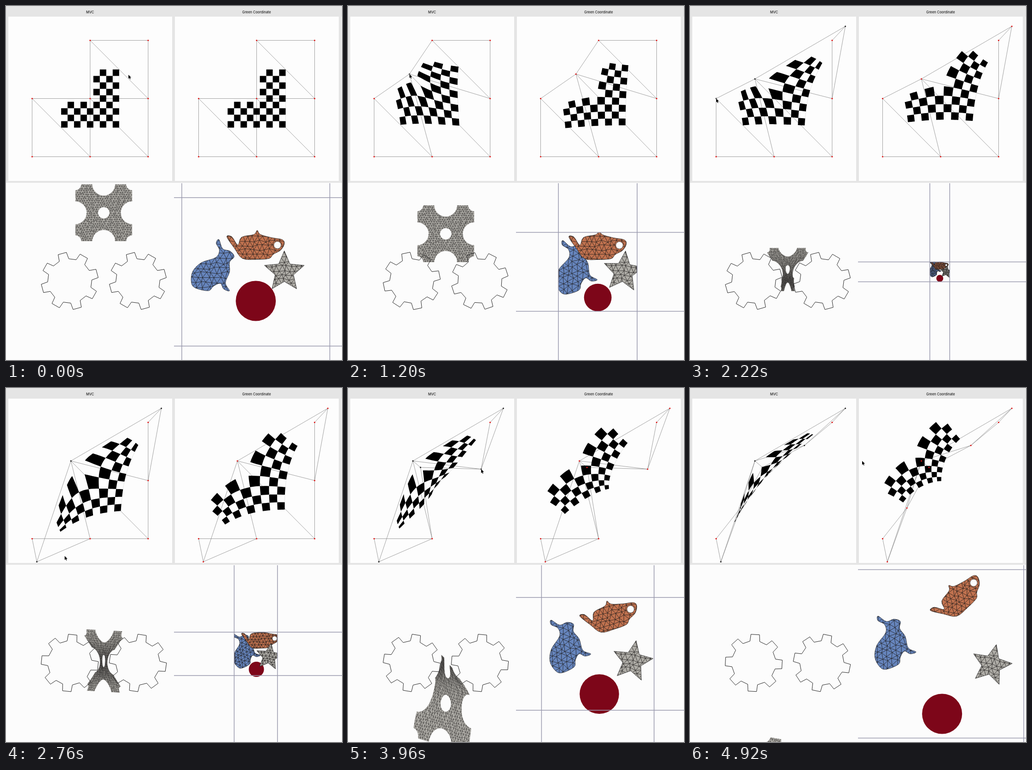
These frames come from a looping animation (730x767 px, 4980 ms). An HTML page with a canvas:

```html
<!DOCTYPE html>
<html lang="en">
<head>
<meta charset="utf-8">
<title>Cage deformation and elastic contact</title>
<style>
html, body { margin: 0; width: 100%; height: 100%; overflow: hidden; background: #fcfcfc; }
canvas { display: block; }
</style>
</head>
<body>
<canvas id="stage" width="730" height="767"></canvas>
<script>
const ctx = document.getElementById('stage').getContext('2d');
const LOOP = 4980, STEP = 60, TAU = Math.PI * 2, DEG = TAU / 360;

const clamp = (v, low, high) => Math.min(high, Math.max(low, v));
const lerp = (a, b, f) => a + (b - a) * f;
const turn = ([x, y], a) => [x * Math.cos(a) - y * Math.sin(a), x * Math.sin(a) + y * Math.cos(a)];
const noise = n => { const s = Math.sin(n * 127.1) * 43758.5453; return s - Math.floor(s) - .5; };

// Linear keyframes: each key is [time, ...values].
function track(t, keys) {
  const i = keys.findIndex(k => k[0] > t);
  if (i < 1) return keys[i < 0 ? keys.length - 1 : 0].slice(1);
  const a = keys[i - 1], b = keys[i], f = (t - a[0]) / (b[0] - a[0]);
  return a.slice(1).map((v, k) => lerp(v, b[k + 1], f));
}

function trace(points, close = true) {
  points.forEach(([x, y], i) => i ? ctx.lineTo(x, y) : ctx.moveTo(x, y));
  if (close) ctx.closePath();
}

// ---------- Cage deformation ----------
const UNIT = 126, CELL = UNIT / 9, LEFT = 56.8, TOP = 74.5;
const cage = [[1, 0], [2, 0], [2, 1], [2, 2], [1, 2], [0, 2], [0, 1], [1, 1]]
  .map(([i, j]) => [LEFT + i * UNIT, TOP + j * UNIT]);
const cageEdges = [...cage.map((_, i) => [i, (i + 1) % 8]), [0, 2], [7, 2], [7, 3], [7, 4], [6, 4]];

// Vertex, start time, end time, destination.
const drags = [
  [7, 180, 540, 107.5, 136.5], [7, 540, 1200, 133.5, 147.5], [7, 1200, 1320, 141, 158],
  [0, 1500, 2040, 337.5, 44], [6, 2220, 2700, 67, 376.5], [3, 2940, 3345, 157.5, 172],
  [2, 3840, 4210, 248.5, 124.5], [4, 4440, 4740, 109.5, 260]
];
const vertexKeys = cage.map(v => [[0, ...v]]);
const pointerKeys = [[0, 266, 149]];
for (const [vertex, start, end, x, y] of drags) {
  const keys = vertexKeys[vertex];
  const move = [[start, ...keys[keys.length - 1].slice(1)], [end, x, y]];
  keys.push(...move);
  pointerKeys.push(...move);
}
pointerKeys.push([4920, 374, 158]);

function meanValue(p) {
  const d = cage.map(v => [v[0] - p[0], v[1] - p[1]]);
  const r = d.map(v => Math.hypot(...v));
  const halfTan = d.map((a, i) => {
    const j = (i + 1) % 8, b = d[j];
    return (a[0] * b[1] - a[1] * b[0]) / (r[i] * r[j] + a[0] * b[0] + a[1] * b[1]);
  });
  const w = r.map((len, i) => (halfTan[(i + 7) % 8] + halfTan[i]) / len);
  const sum = w.reduce((a, b) => a + b);
  return { phi: w.map(v => v / sum) };
}

function green(p) {
  const phi = Array(8).fill(0), psi = [];
  cage.forEach((a, i) => {
    const j = (i + 1) % 8, b = cage[j];
    const len = Math.hypot(b[0] - a[0], b[1] - a[1]);
    const tx = (b[0] - a[0]) / len, ty = (b[1] - a[1]) / len;
    const x = a[0] - p[0], y = a[1] - p[1];
    const s0 = x * tx + y * ty, s1 = s0 + len, d = x * ty - y * tx;
    const l0 = Math.log(Math.hypot(s0, d)), l1 = Math.log(Math.hypot(s1, d));
    const angle = Math.atan2(d * len, s0 * s1 + d * d);
    const end = (d * (l1 - l0) - s0 * angle) / (TAU * len);
    phi[j] += end;
    phi[i] += angle / TAU - end;
    psi[i] = -(s1 * l1 - s0 * l0 - len + d * angle) / (TAU * len);
  });
  return { phi, psi };
}

function deform({ phi, psi }, verts) {
  let x = 0, y = 0;
  verts.forEach((v, i) => {
    x += phi[i] * v[0];
    y += phi[i] * v[1];
    if (psi) {
      const next = verts[(i + 1) % 8];
      x += psi[i] * (next[1] - v[1]);
      y -= psi[i] * (next[0] - v[0]);
    }
  });
  return [x, y];
}

// The tiny offset keeps samples off the lines through the cage edges.
const boardPoint = (i, j) => [LEFT + UNIT / 2 + i * CELL + .001, TOP + UNIT / 2 + j * CELL + .001];
const blackCells = [];
for (let j = 0; j < 9; j++) for (let i = j < 5 ? 5 : 0; i < 9; i++) {
  if ((i + j) % 2) continue;
  const cell = [];
  for (const [x, y, dx, dy] of [[0, 0, 1, 0], [1, 0, 0, 1], [1, 1, -1, 0], [0, 1, 0, -1]])
    for (let k = 0; k < 1; k += .25) cell.push(boardPoint(i + x + dx * k, j + y + dy * k));
  blackCells.push(cell);
}
const rightSide = Array.from({ length: 37 }, (_, k) => boardPoint(9, k / 4));
const panels = [[0, meanValue], [361.7, green]].map(([offset, weigh]) => ({
  offset,
  cells: blackCells.map(c => c.map(weigh)),
  side: rightSide.map(weigh)
}));

function drawCagePanel(panel, verts, t) {
  const place = w => deform(w, verts);
  ctx.save();
  ctx.translate(panel.offset, 0);
  ctx.lineWidth = .7;
  ctx.strokeStyle = '#777';
  ctx.beginPath();
  cageEdges.forEach(([a, b]) => trace([verts[a], verts[b]], false));
  ctx.stroke();
  ctx.strokeStyle = '#ddd';
  ctx.beginPath();
  trace(panel.side.map(place), false);
  ctx.stroke();
  ctx.fillStyle = '#000';
  ctx.beginPath();
  panel.cells.forEach(cell => trace(cell.map(place)));
  ctx.fill();
  verts.forEach(([x, y], i) => {
    const touched = panel.offset === 0 && vertexKeys[i].length > 1 && t >= vertexKeys[i][1][0];
    ctx.fillStyle = touched ? '#222' : '#e01818';
    ctx.beginPath();
    ctx.arc(x, y, 1.6, 0, TAU);
    ctx.fill();
  });
  ctx.restore();
}

function drawPointer([x, y]) {
  ctx.beginPath();
  trace([[0, 0], [0, 8.5], [2, 6.8], [3.4, 9.8], [4.7, 9.2], [3.4, 6.2], [6, 6]]
    .map(([a, b]) => [x + a, y + b]));
  ctx.lineWidth = 1;
  ctx.strokeStyle = '#fff';
  ctx.stroke();
  ctx.fillStyle = '#000';
  ctx.fill();
}

// ---------- Triangulated bodies ----------
function densify(points) {
  return points.flatMap((a, i) => {
    const b = points[(i + 1) % points.length];
    const n = Math.ceil(Math.hypot(b[0] - a[0], b[1] - a[1]) / 4);
    return Array.from({ length: n }, (_, k) => [lerp(a[0], b[0], k / n), lerp(a[1], b[1], k / n)]);
  });
}

// Closed Catmull-Rom curve through the points, relative to a centre.
function spline(cx, cy, points) {
  const n = points.length;
  return points.flatMap((p1, i) => {
    const p0 = points[(i + n - 1) % n], p2 = points[(i + 1) % n], p3 = points[(i + 2) % n];
    return [0, .25, .5, .75].map(u => [0, 1].map(c =>
      p1[c] + .5 * u * (p2[c] - p0[c] + u * (2 * p0[c] - 5 * p1[c] + 4 * p2[c] - p3[c]
        + u * (3 * (p1[c] - p2[c]) + p3[c] - p0[c]))) - [cx, cy][c]));
  });
}

const arc = (cx, cy, r, from, to, n = 14) => Array.from({ length: n + 1 }, (_, k) => {
  const a = lerp(from, to, k / n);
  return [cx + r * Math.cos(a), cy + r * Math.sin(a)];
});

// A jittered triangular grid, clipped to the loops when drawn.
function body(loops, fill, spacing, extent, line) {
  const n = Math.ceil(extent * 2 / spacing), rows = Math.ceil(n / .866);
  const nodes = [], edges = [];
  const id = (i, j) => j * (n + 1) + i;
  for (let j = 0; j <= rows; j++) for (let i = 0; i <= n; i++) {
    const k = id(i, j), odd = j % 2, side = i + (odd ? 1 : -1);
    nodes.push([-extent + (i + odd / 2 + noise(k + 1) * .5) * spacing,
                -extent + (j * .866 + noise(k + 5000) * .5) * spacing]);
    if (i < n) edges.push([k, id(i + 1, j)]);
    if (j < rows) {
      edges.push([k, id(i, j + 1)]);
      if (side >= 0 && side <= n) edges.push([k, id(side, j + 1)]);
    }
  }
  return { loops: loops.map(densify), fill, nodes, edges, line };
}

function drawBody({ loops, fill, nodes, edges, line }, warp) {
  const outline = new Path2D();
  loops.forEach(loop => {
    loop.map(warp).forEach(([x, y], i) => i ? outline.lineTo(x, y) : outline.moveTo(x, y));
    outline.closePath();
  });
  ctx.fillStyle = fill;
  ctx.fill(outline);
  ctx.save();
  ctx.clip(outline);
  const placed = nodes.map(warp);
  ctx.strokeStyle = '#1c1a1a';
  ctx.lineWidth = line;
  ctx.beginPath();
  edges.forEach(([a, b]) => trace([placed[a], placed[b]], false));
  ctx.stroke();
  ctx.restore();
  ctx.lineWidth = .8;
  ctx.stroke(outline);
}

// ---------- Soft plate pulled through two gears ----------
const HALF = 62, GEAR_Y = 595.7, PLATE_X = 212.3, CONTACT = 1200;
const plateSide = [...arc(-HALF, -HALF, 13, TAU / 4, 0, 5), ...arc(0, -HALF, 24.5, TAU / 2, 0)];
const plate = body([
  [0, 1, 2, 3].flatMap(q => plateSide.map(p => turn(p, q * TAU / 4))),
  arc(0, 0, 12, TAU, 0, 24).slice(1)
], '#b7b5af', 5.2, HALF, .55);

// Time, centre height, vertical stretch, tilt.
const plateKeys = [[CONTACT, 493.5, 1, 0], [2220, 571, .76, 0], [3300, 612, 1.4, .08],
                   [3960, 683, 1.5, .2], [4920, 826, 1, .17]];

function drawPlate(t) {
  const [cy, stretch, tilt] = t < CONTACT ? [448 + 3.16e-5 * t * t, 1, 0] : track(t, plateKeys);
  const pinch = .78 * clamp((t - CONTACT) / 800, 0, 1);
  drawBody(plate, p => {
    const [px, py] = turn(p, tilt);
    const y = cy + py * stretch;
    return [PLATE_X + px * (1 - pinch * Math.exp(-(((y - GEAR_Y) / 60) ** 2))), y];
  });
}

function drawGear(cx, degrees) {
  const points = [];
  for (let k = 0; k < 8; k++)
    for (const [r, a] of [[48, -12.8], [62.3, -8.6], [62.3, 8.6], [48, 12.8]]) {
      const [x, y] = turn([0, -r], (degrees + a + k * 45) * DEG);
      points.push([cx + x, GEAR_Y + y]);
    }
  ctx.beginPath();
  trace(points);
  ctx.lineWidth = 1;
  ctx.strokeStyle = '#222';
  ctx.stroke();
}

// ---------- Bodies in a shrinking and growing box ----------
const BOX_X = 542.7, BOX_Y = 576, NARROWEST = 2287, MIN_HALF = 17.4, MAX_HALF = 182.5;

const bunny = body([spline(450, 570, [
  [463, 506], [471, 526], [487, 531], [496, 543], [486, 555], [486, 576], [477, 600],
  [486, 617], [473, 613], [466, 601], [451, 607], [440, 617], [412, 611], [403, 599],
  [406, 575], [425, 556], [456, 545], [464, 529], [457, 514]])], '#6685bd', 12, 75, .8);

const teapot = body([spline(543, 520, [
  [480, 500], [491, 500], [504, 518], [512, 501], [539, 495], [546, 486], [553, 495], [578, 502],
  [600, 506], [605, 515], [597, 529], [581, 538], [572, 547], [545, 549], [514, 547], [496, 524]]),
  arc(47, -2, 8, TAU, 0)], '#c0724f', 11, 68, .8);

const star = body([Array.from({ length: 10 }, (_, k) => turn([0, k % 2 ? -21 : -45.5], k * TAU / 10))],
  '#aeaca6', 11, 50, .8);

// Offsets from the box centre before and after the squeeze, and angles when squeezed and at the end.
const floating = [
  { shape: bunny, from: [-93, -6], to: [-108, -22], squeezed: -40, end: -35 },
  { shape: teapot, from: [0, -56], to: [40, -121], squeezed: 0, end: -42 },
  { shape: star, from: [62, 0], to: [112, 24], squeezed: 8, end: 14 }
];
const disc = { from: [0, 63], to: [5, 130] };

function drawBox(t) {
  const half = MIN_HALF + .0627 * Math.abs(t - NARROWEST);
  const growing = t > NARROWEST;
  const grown = (half - MIN_HALF) / (MAX_HALF - MIN_HALF);
  const squeeze = clamp((130 - half) / 60, 0, 1);
  const scale = Math.min(1, half / 72);
  // Walls push bodies inwards; afterwards they spread in proportion to the box.
  const position = ({ from, to }) => [0, 1].map(c => [BOX_X, BOX_Y][c] +
    (growing ? to[c] * half / MAX_HALF : clamp(from[c], -.65 * half, .65 * half)));
  const inside = (v, c) => clamp(v, c - half, c + half);

  ctx.fillStyle = '#7d0619';
  ctx.beginPath();
  ctx.arc(...position(disc), Math.min(43.5, .35 * half), 0, TAU);
  ctx.fill();

  for (const item of floating) {
    const [x, y] = position(item);
    const angle = growing ? lerp(item.squeezed, item.end, grown ** 2) : item.squeezed * squeeze;
    drawBody(item.shape, p => {
      const [px, py] = turn(p, angle * DEG);
      return [inside(x + px * scale, BOX_X), inside(y + py * scale, BOX_Y)];
    });
  }

  ctx.strokeStyle = '#9a9aae';
  ctx.lineWidth = 1.5;
  ctx.beginPath();
  for (const side of [-half, half]) {
    if (BOX_X + side > 365) trace([[BOX_X + side, 384], [BOX_X + side, 767]], false);
    trace([[365, BOX_Y + side], [730, BOX_Y + side]], false);
  }
  ctx.stroke();
}

// ---------- Scene ----------
function drawBackground() {
  ctx.fillStyle = '#fcfcfc';
  ctx.fillRect(0, 0, 730, 767);
  ctx.fillStyle = '#e5e5e5';
  ctx.fillRect(0, 0, 730, 383);
  ctx.fillStyle = '#fdfdfd';
  for (const x of [5, 367, 729]) ctx.fillRect(x, 23, 356, 356);
  ctx.fillStyle = '#222';
  ctx.font = '500 7.4px Inter, sans-serif';
  ctx.textAlign = 'center';
  ctx.fillText('MVC', 182.5, 16);
  ctx.fillText('Green Coordinate', 544.5, 16);
}

function frame() {
  const t = Math.floor(performance.now() % LOOP / STEP) * STEP;
  drawBackground();
  const verts = vertexKeys.map(keys => track(t, keys));
  panels.forEach(panel => drawCagePanel(panel, verts, t));
  drawPointer(track(t, pointerKeys));
  drawPlate(t);
  const spin = -15.3 + .0403 * t;
  drawGear(138.5, spin);
  drawGear(286.5, 14.5 - spin);
  drawBox(t);
  requestAnimationFrame(frame);
}
requestAnimationFrame(frame);
</script>
</body>
</html>
```
